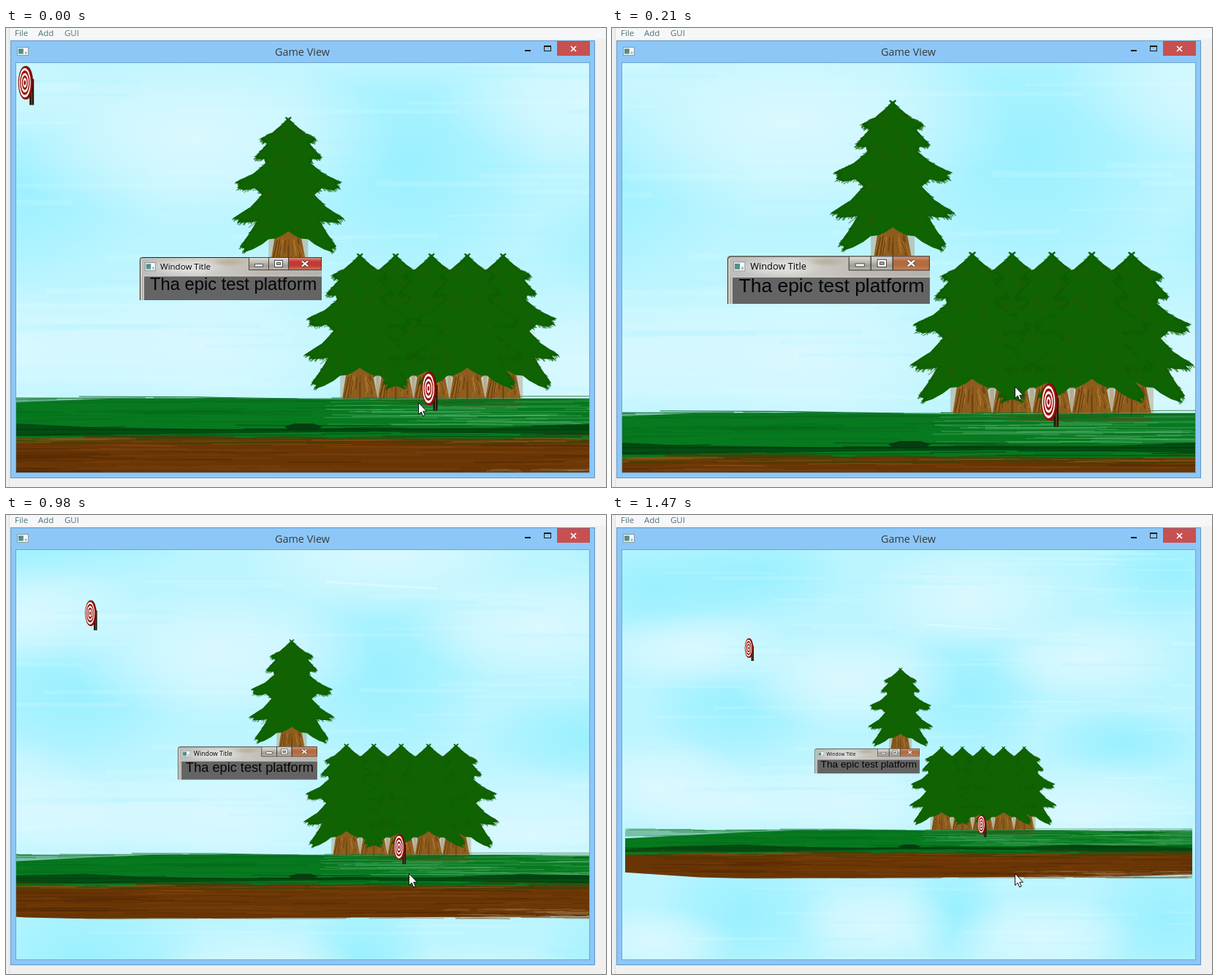
Recreate the animation shown at these times as an HTML page with a canvas. Size 821x629 px, loop 2730 ms.

```html
<!DOCTYPE html>
<html lang="en">
<head>
<meta charset="utf-8">
<title>Game View</title>
<style>
  html, body { margin: 0; width: 100%; height: 100%; overflow: hidden; background: #f0f0f0; }
  canvas { display: block; }
</style>
</head>
<body>
<canvas id="stage" width="821" height="629"></canvas>
<script>
const ctx = document.getElementById('stage').getContext('2d');
const LOOP = 2730;
const CENTER = { x: 406, y: 328.5 };
const SKY_SCALE = 1.735;

// Camera zoom and mouse position, each held until the next start time.
const poses = [
  { start: 0, zoom: 1, mouse: [564, 513], close: '#c33a35' },
  { start: 140, zoom: 1.055, mouse: [551, 491] },
  { start: 210, zoom: 1.112, mouse: [551, 491] },
  { start: 840, zoom: 0.923, mouse: [551, 491] },
  { start: 910, zoom: 0.841, mouse: [551, 491] },
  { start: 980, zoom: 0.765, mouse: [551, 491] },
  { start: 1400, zoom: 0.694, mouse: [551, 491] },
  { start: 1470, zoom: 0.5765, mouse: [551, 491] },
];

let seed = 1;
function random(min = 0, max = 1) {
  seed = (seed * 16807) % 2147483647;
  return min + (max - min) * seed / 2147483647;
}

function rect(x, y, w, h, color) {
  ctx.fillStyle = color;
  ctx.fillRect(x, y, w, h);
}

function frame(x, y, w, h, color, width = 1) {
  ctx.strokeStyle = color;
  ctx.lineWidth = width;
  ctx.strokeRect(x + width / 2, y + width / 2, w - width, h - width);
}

function polygon(points, color) {
  ctx.fillStyle = color;
  ctx.beginPath();
  points.forEach(([x, y]) => ctx.lineTo(x, y));
  ctx.closePath();
  ctx.fill();
}

function line(points, color, width) {
  ctx.strokeStyle = color;
  ctx.lineWidth = width;
  ctx.beginPath();
  points.forEach(([x, y]) => ctx.lineTo(x, y));
  ctx.stroke();
}

function text(string, x, y, size, color, family = '"Open Sans", sans-serif') {
  ctx.font = `${size}px ${family}`;
  ctx.fillStyle = color;
  ctx.fillText(string, x, y);
}

function gradient(x0, y0, x1, y1, ...colors) {
  const fill = ctx.createLinearGradient(x0, y0, x1, y1);
  colors.forEach((color, i) => fill.addColorStop(i / (colors.length - 1), color));
  return fill;
}

function zoomBy(factor) {
  ctx.translate(CENTER.x, CENTER.y);
  ctx.scale(factor, factor);
  ctx.translate(-CENTER.x, -CENTER.y);
}

// Soft horizontal brush strokes scattered over a box.
function brush(count, [left, top, right, bottom], length, width, color) {
  for (let i = 0; i < count; i++) {
    const x = random(left, right), y = random(top, bottom);
    const end = Math.min(right, x + random(0.3, 1) * length);
    line([[x, y], [(x + end) / 2, y + random(-1, 1)], [end, y + random(-1, 1)]],
      color, random(0.3, 1) * width);
  }
}

function blob(x, y, rx, ry, rgb, alpha) {
  ctx.save();
  ctx.translate(x, y);
  ctx.scale(rx, ry);
  const fill = ctx.createRadialGradient(0, 0, 0, 0, 0, 1);
  fill.addColorStop(0, `rgba(${rgb},${alpha})`);
  fill.addColorStop(0.5, `rgba(${rgb},${alpha * 0.6})`);
  fill.addColorStop(1, `rgba(${rgb},0)`);
  rect(-1, -1, 2, 2, fill);
  ctx.restore();
}

function drawSky() {
  const cyan = '146,239,255', pale = '223,249,255';
  rect(0, 0, 821, 629, '#bdf5ff');
  const cyanSpots = [[60, 100, 150, 80], [200, 80, 130, 70], [170, 265, 130, 80], [490, 245, 110, 110],
    [765, 75, 120, 80], [180, 545, 130, 100], [760, 550, 120, 110], [700, 310, 120, 50], [470, 540, 70, 80]];
  const paleSpots = [[490, 115, 150, 75], [110, 185, 140, 55], [320, 225, 160, 70], [175, 392, 150, 50],
    [60, 370, 130, 70], [650, 195, 140, 60], [640, 410, 200, 70], [330, 390, 130, 70],
    [60, 585, 110, 50], [590, 580, 130, 60], [360, 560, 110, 60]];
  cyanSpots.forEach(spot => blob(...spot, cyan, 0.8));
  paleSpots.forEach(spot => blob(...spot, pale, 0.85));
  seed = 71;
  brush(90, [0, 40, 810, 615], 240, 5, 'rgba(225,250,255,0.16)');
  brush(60, [0, 40, 810, 615], 200, 5, 'rgba(155,240,255,0.14)');
  line([[430, 150], [490, 154], [545, 157]], 'rgba(255,255,255,0.3)', 2);
}

// Right half of the foliage, measured from the tip of the tree.
const foliage = [[0, 1], [8, 9], [22, 21], [38, 29], [35, 33], [29, 36], [38, 46], [45, 54], [43, 57],
  [33, 57], [31, 63], [48, 77], [73, 89], [66, 92], [70, 96], [61, 100], [46, 97], [36, 106], [52, 123],
  [77, 139], [67, 140], [70, 144], [55, 144], [43, 142], [54, 160], [66, 177], [60, 180], [61, 185],
  [49, 181], [36, 174], [27, 167], [17, 166], [7, 161], [0, 156]];

function drawTrunk() {
  rect(-27, 165, 54, 33, 'rgba(160,105,45,0.3)');
  polygon([[-1, 154], [1, 154], [18, 166], [24, 198], [-24, 198], [-19, 166]], '#8e5c1c');
  for (let i = 0; i < 26; i++) {
    const x = random(-22, 22);
    const color = i % 2 ? 'rgba(88,50,8,0.55)' : 'rgba(183,128,53,0.55)';
    line([[x * 0.7, random(164, 176)], [x, random(186, 200)]], color, random(0.7, 1.8));
  }
}

function drawTree(x, y) {
  ctx.save();
  ctx.translate(x, y);
  seed = 19;
  drawTrunk();
  const mirrored = foliage.map(([px, py]) => [-px, py]).reverse();
  polygon([...foliage, ...mirrored], '#0f6302');
  line([[-4, 0], [0, 4], [4, 0]], '#17640e', 1.6);
  for (const side of [-1, 1]) {
    for (let i = 1; i < foliage.length - 6; i++) {
      const [ax, ay] = foliage[i - 1], [bx, by] = foliage[i];
      for (let n = 0; n < 7; n++) {
        const t = random(), px = ax + (bx - ax) * t, py = ay + (by - ay) * t;
        line([[side * (px - 4), py - 2], [side * (px + random(-1, 3)), py + random(0, 4)]],
          'rgba(15,94,5,0.6)', 1.2);
      }
    }
    for (let i = 0; i < 42; i++) {
      const tier = [4, 38, 72, 118][i % 4];
      const px = random(0, 14 + tier * 0.3), py = tier + random(8, 38);
      const reach = random(3, 12);
      line([[side * px, py], [side * (px + reach), py + reach * random(0.5, 1)]],
        'rgba(72,78,0,0.42)', random(0.6, 1.5));
    }
  }
  ctx.restore();
}

function drawGround() {
  const left = -267, right = 1079;
  seed = 305;
  rect(left, 507, 1346, 16, 'rgba(10,115,40,0.4)');
  polygon([[left, 527], [-140, 521], [14, 513], [140, 508], [280, 507], [500, 509], [760, 508],
    [right, 513], [right, 567], [left, 567]], '#07791f');
  brush(40, [left, 506, right, 514], 260, 1.6, 'rgba(10,105,30,0.6)');
  line([[left, 504.5], [-195, 504.5]], '#3d9a62', 1);
  line([[100, 505], [240, 505.5], [400, 508]], '#17703a', 1);
  line([[560, 508], [720, 504.5], [right, 504.5]], '#438c5d', 1);
  brush(80, [430, 512, right, 543], 210, 2, 'rgba(125,205,155,0.27)');
  brush(30, [left, 515, 500, 540], 230, 2.5, 'rgba(0,100,25,0.3)');

  polygon([[left, 553], [-160, 546], [14, 542], [120, 547], [300, 550], [480, 548], [660, 548],
    [800, 542], [960, 546], [right, 550], [right, 558], [800, 557], [500, 553], [100, 558], [left, 560]],
    'rgba(3,70,16,0.85)');
  polygon([[381, 546], [395, 542], [420, 542], [433, 546], [425, 551], [388, 551]], '#073d11');
  line([[left, 550], [400, 550.5], [right, 550]], '#06350c', 1);
  brush(35, [left, 544, right, 560], 280, 2, 'rgba(3,58,14,0.5)');

  polygon([[left, 566], [100, 565], [250, 561], [500, 564], [right, 562], [right, 613],
    [900, 618], [500, 620], [0, 622], [-90, 620], [left, 608]], '#693504');
  brush(70, [left, 558, right, 570], 240, 3, 'rgba(68,63,8,0.65)');
  brush(35, [left, 562, right, 574], 190, 1.5, 'rgba(165,84,20,0.55)');
  brush(55, [left, 570, right, 614], 280, 3, 'rgba(133,72,17,0.3)');
  brush(40, [left, 570, right, 614], 280, 3, 'rgba(76,35,0,0.4)');
  brush(30, [-100, 614, right, 622], 280, 2, 'rgba(105,53,4,0.6)');
  brush(75, [640, 604, right, 621], 80, 1.5, 'rgba(172,139,101,0.4)');
}

function drawTarget(x, y) {
  rect(x + 6, y - 5, 6, 35.5, '#21170c');
  rect(x + 8.5, y - 2, 1.2, 32, '#765126');
  const disc = (dx, rx, ry, color) => {
    ctx.fillStyle = color;
    ctx.beginPath();
    ctx.ellipse(x + dx, y, rx, ry, 0, 0, 7);
    ctx.fill();
  };
  disc(1.5, 9.5, 23, '#6c0b07');
  disc(0, 9.5, 23, '#94120d');
  for (let ring = 0; ring < 6; ring++) {
    const size = 1 - ring / 6;
    disc(-0.4, 8 * size, 20 * size, ring % 2 ? '#94120d' : '#fff8f5');
  }
}

function drawAppIcon(x, y, w, h) {
  rect(x, y, w, h, '#f5f8f8');
  frame(x, y, w, h, '#8b9799');
  rect(x + w * 0.12, y + h * 0.2, w * 0.43, h * 0.6, gradient(x, y, x, y + h, '#477f9b', '#51a577'));
  rect(x + w * 0.68, y + h * 0.55, w * 0.16, h * 0.25, '#9bb2b5');
}

function drawPlatform(closeColor = '#b26c3e') {
  rect(183, 314, 249, 59, '#b5b3af');
  rect(184, 315, 248, 25, gradient(184, 0, 432, 0, '#bcbcba', '#d0cfcb', '#bfb9b2', '#b4b2ac'));
  blob(246, 328, 56, 12, '245,245,245', 0.6);
  blob(305, 321, 24, 6, '165,155,115', 0.5);
  line([[183.5, 373], [183.5, 317], [186, 314.5], [432, 314.5]], '#24231f', 1);
  line([[184.7, 373], [184.7, 317]], '#efefef', 1);
  rect(189, 340, 243, 33, '#646464');
  line([[188.5, 373], [188.5, 340], [432, 340]], '#e0e0dd', 0.8);
  drawAppIcon(190, 321, 15, 12);
  text('Window Title', 211, 331, 11.5, '#000');

  rect(332, 314, 54, 18, gradient(0, 314, 0, 332, '#e3e1dc', '#c6c3bc', '#9f9c94', '#bfbcb5'));
  rect(386, 314, 46, 18, gradient(0, 314, 0, 332, '#d9a18b', closeColor, closeColor, '#c98765'));
  for (const [x, w] of [[332, 28], [359, 28], [386, 46]]) frame(x, 314, w, 18, '#45423e');
  rect(340, 323, 12, 4.5, '#555');
  rect(341, 324, 10, 2.5, '#fff');
  frame(367, 318, 12, 10, '#4b4b4b');
  frame(368, 319, 10, 8, '#fff', 2);
  frame(370, 321, 6, 4, '#555');
  for (const [color, width] of [['#573c34', 3.8], ['#fff', 2.2]]) {
    line([[405, 319.5], [413, 326.5]], color, width);
    line([[413, 319.5], [405, 326.5]], color, width);
  }
  text('Tha epic test platform', 197, 359, 23.75, '#050505', '"Liberation Sans", Arial, sans-serif');
}

function drawChrome() {
  rect(0, 0, 821, 629, '#f0f0f0');
  rect(5, 0, 816, 15, '#f6f7f8');
  rect(4, 0, 1, 629, '#dcdddd');
  text('File', 12, 11, 11.5, '#4e7479');
  text('Add', 44, 11, 11.5, '#4e7479');
  text('GUI', 80, 11, 11.5, '#4e7479');
  rect(6, 17, 800, 600, '#8dc7f8');
  frame(6, 17, 800, 600, '#6097c5');
  frame(13, 47, 786, 563, '#6ba6cf');
  drawAppIcon(15, 26, 16, 12);
  text('Game View', 368, 38, 14.4, '#393c35');
  rect(710, 30, 8, 2, '#171d1c');
  frame(736, 24, 10, 8, '#171d1c');
  rect(736, 24, 10, 2, '#171d1c');
  rect(754, 18, 45, 20, '#c75050');
  line([[773, 25], [780, 32]], '#fff', 1.7);
  line([[780, 25], [773, 32]], '#fff', 1.7);
}

function drawCursor(x, y) {
  const shape = [[0, 0], [0, 16], [3.7, 12.6], [6.2, 18.4], [8.7, 17.3], [6.2, 11.7], [11, 11.7]]
    .map(([dx, dy]) => [x + dx + 0.5, y + dy + 0.5]);
  polygon(shape, '#fff');
  line([...shape, shape[0]], '#111', 1);
}

function draw({ zoom, mouse, close }) {
  drawChrome();
  ctx.save();
  ctx.beginPath();
  ctx.rect(14, 48, 784, 561);
  ctx.clip();
  ctx.save();
  zoomBy(zoom * SKY_SCALE);
  drawSky();
  ctx.restore();
  zoomBy(zoom);
  drawGround();
  drawTree(386.3, 122.5);
  for (const slot of [1, 2, 4, 0, 3]) drawTree(484.2 + 49 * slot, 309.5);
  seed = 88;
  brush(22, [460, 507, 705, 516], 75, 1.6, 'rgba(15,112,35,0.55)');
  brush(12, [470, 508, 706, 518], 130, 1, 'rgba(104,78,24,0.55)');
  drawPlatform(close);
  drawTarget(26.2, 75);
  drawTarget(578.5, 494);
  ctx.restore();
  drawCursor(...mouse);
}

let shown;
function tick() {
  const time = performance.now() % LOOP;
  const pose = poses.findLast(({ start }) => start <= time);
  if (pose !== shown) draw(shown = pose);
  requestAnimationFrame(tick);
}
tick();
</script>
</body>
</html>
```
